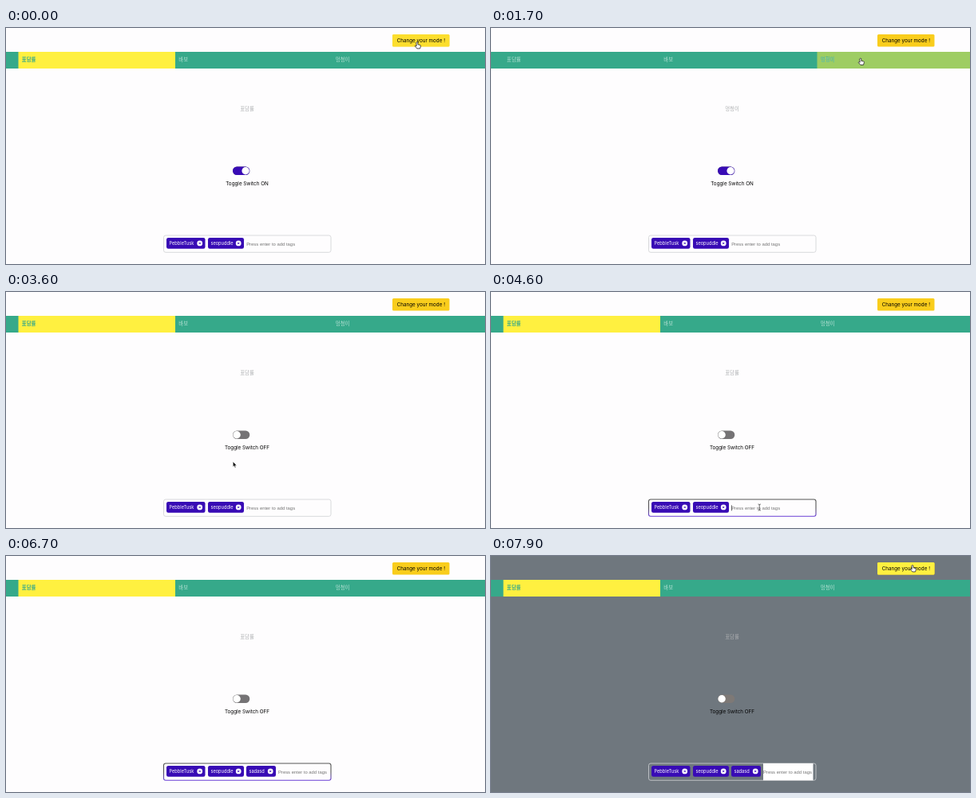
Write an HTML page that moves like this. It is 600 by 297 pixels and loops after 8 s.

```html
<!DOCTYPE html>
<html lang="ko">
<head>
<meta charset="utf-8">
<title>Components</title>
<style>
  html, body { margin: 0; height: 100%; overflow: hidden; background: #fefdfe; }
  svg { display: block; width: 100vw; height: 100vh; }
  text { font: 6.3px Inter, sans-serif; }
  .ko { font: 500 6.4px "Noto Sans CJK KR", "Noto Sans CJK", sans-serif; }
  .tag text { font-size: 5.7px; fill: #fff; }
  .field { font: 5.9px "Liberation Sans", Arial, sans-serif; }
  .mid { text-anchor: middle; }
</style>
</head>
<body>
<svg viewBox="0 0 600 297">
  <defs>
    <linearGradient id="focusLine" x2="0" y2="1">
      <stop offset=".5" stop-color="#555"/>
      <stop offset="1" stop-color="#6a3fd6"/>
    </linearGradient>
  </defs>
  <rect id="page" width="600" height="297"/>

  <rect x="484" y="8" width="71.5" height="15.5" rx="1.5" fill="#f9cd1c"/>
  <rect id="hover" x="484" y="8" width="71.5" height="15.5" rx="1.5" fill="#fff040"/>
  <text class="mid" x="519.8" y="17.8">Change your mode !</text>

  <rect y="30" width="600" height="21" fill="#36a98a"/>
  <g id="tabs"></g>
  <text id="content" class="ko mid" x="302" y="104" style="font-weight:400" fill="#adafb1"></text>

  <rect id="trackOff" x="284" y="174.5" width="21.3" height="10.4" rx="5.2"/>
  <rect id="trackOn" x="284" y="174.5" width="21.3" height="10.4" rx="5.2" fill="#380bb5"/>
  <circle id="knob" cy="179.7" r="4.7" fill="#fff"/>
  <text id="status" class="mid" x="302" y="197.8"></text>

  <rect id="box" x="197.5" y="261" width="209.5" height="21.3" rx="2.5" fill="none"/>
  <rect id="inputBack" x="341" y="261" width="62.5" height="21.3" fill="#fff"/>
  <g id="tags"></g>
  <text id="hint" class="field" y="274" fill="#757575">Press enter to add tags</text>
  <text id="typed" class="field" x="301.2" y="274"></text>
  <rect id="caret" y="268.3" width=".6" height="7" fill="#111"/>

  <g id="cursor" stroke-linejoin="round" stroke-linecap="round">
    <path id="hand" fill="#fff" stroke="#222" stroke-width=".8"
      d="M-1 .5Q0-.6 .9.5V3.3L3.8 3.9Q4.7 4.3 4.4 5.6L3.6 8.4H-.1L-2.7 5.3Q-2.8 4-1 4.9Z"/>
    <path id="arrow" fill="#111" stroke="#fff" stroke-width=".5"
      d="M0 0V6.6L1.5 5.3L2.5 7.7L3.6 7.2L2.6 4.9H4.6Z"/>
    <path id="beam" fill="none" stroke="#333" stroke-width=".7"
      d="M-1.3-4Q0-4 0-3.2V3.2Q0 4-1.3 4M1.3-4Q0-4 0-3.2M0 3.2Q0 4 1.3 4"/>
  </g>
</svg>

<script>
const LOOP = 8000;
const $ = id => document.getElementById(id);
const set = (id, attrs) => {
  for (const name in attrs) $(id).setAttribute(name, attrs[name]);
};
const show = (id, visible) => set(id, { opacity: visible ? 1 : 0 });

const tabs = [
  { name: '표담률', x: 15.5, w: 196.5 },
  { name: '바보', x: 212, w: 196.5 },
  { name: '멍청이', x: 408.5, w: 191.5 }
];
const tags = [
  { name: 'PebbleTusk', x: 201, w: 48.5 },
  { name: 'seopuddle', x: 253, w: 45 },
  { name: 'sadasd', x: 301, w: 37 }
];

$('tabs').innerHTML = tabs.map(({ name, x, w }, i) => {
  const label = style => `<text class="ko" x="${x + 4.3}" y="42.4" ${style}>${name}</text>`;
  return label('fill="#b9e2d6"') + `<g id="tab${i}">
    <rect x="${x}" y="30" width="${w}" height="21" fill="#fff040"/>
    ${label('fill="#36a98a" style="font-weight:700"')}</g>`;
}).join('');

$('tags').innerHTML = tags.map(({ name, x, w }, i) => {
  const cx = x + w - 6.8;
  return `<g class="tag" id="tag${i}">
    <rect x="${x}" y="264" width="${w}" height="13.7" rx="2.3" fill="#380bb5"/>
    <text x="${x + 3.4}" y="273.2">${name}</text>
    <circle cx="${cx}" cy="270.9" r="3.4" fill="#fff"/>
    <path d="M${cx - 1.2} 269.7l2.4 2.4m0-2.4l-2.4 2.4" stroke="#380bb5" stroke-width=".8"/></g>`;
}).join('');

// Times in ms
const TOGGLE = 3000, FOCUS = 4550, TYPE = 5000, KEY_GAP = 110;
const ENTER = 5995, BLUR = 7500, DARK = 7700, BLINK = 560, FADE = 500;
const WORD = tags[2].name;
const selections = [[-FADE, 0], [930, 1], [1550, 2], [2270, 0]];

const pointer = [
  [0, 515, 17.5], [100, 515, 17.5], [800, 310, 38], [1100, 309.8, 37.5],
  [1480, 470, 38], [1650, 470, 38], [2230, 146, 41], [2400, 139.5, 50.5],
  [2900, 294, 178], [3200, 294, 179], [3600, 284.3, 213.5],
  [4450, 335, 271], [4800, 338, 271], [7000, 338, 271],
  [7450, 527, 13], [7600, 528, 11.5], [LOOP, 528, 11.5]
];
const hover = [[0, .5], [200, .75], [700, 0], [7300, 0], [7600, .8], [7750, 1], [LOOP, 1]];

const clamp = v => Math.min(1, Math.max(0, v));
const smooth = p => p * p * (3 - 2 * p);

// CSS "ease": cubic-bezier(.25, .1, .25, 1)
function ease(p) {
  p = clamp(p);
  const curve = (a, b, s) => 3 * a * s * (1 - s) ** 2 + 3 * b * s * s * (1 - s) + s ** 3;
  let lo = 0, hi = 1;
  for (let i = 0; i < 20; i++) {
    const s = (lo + hi) / 2;
    if (curve(.25, .25, s) < p) lo = s; else hi = s;
  }
  return curve(.1, 1, lo);
}

function sample(steps, t, timing = p => p) {
  const i = Math.max(1, steps.findIndex(step => step[0] > t));
  const [a, b] = [steps[i - 1], steps[i]];
  const p = timing(clamp((t - a[0]) / (b[0] - a[0])));
  return a.slice(1).map((v, k) => v + (b[k + 1] - v) * p);
}

function drawTabs(t) {
  const [since, active] = selections.filter(s => s[0] <= t).pop();
  tabs.forEach((_, i) => set('tab' + i, { opacity: i === active ? ease((t - since) / FADE) : 0 }));
  $('content').textContent = tabs[active].name;
}

function drawToggle(t, dark) {
  const off = ease((t - TOGGLE) / FADE);
  set('trackOff', { fill: dark ? '#7e7976' : '#757375' });
  set('trackOn', { opacity: 1 - off });
  set('knob', { cx: 300.1 - 11 * off });
  $('status').textContent = 'Toggle Switch ' + (t < TOGGLE ? 'ON' : 'OFF');
}

function drawInput(t, dark) {
  const focused = t >= FOCUS && t < BLUR;
  const added = t >= ENTER;
  const count = added ? 0 : Math.min(WORD.length, Math.max(0, Math.floor((t - TYPE) / KEY_GAP) + 1));
  const start = added ? 341 : 301.2;
  const lastAction = added ? ENTER : count ? TYPE + (count - 1) * KEY_GAP : FOCUS;

  set('box', {
    stroke: focused ? 'url(#focusLine)' : dark ? '#c3c7ca' : '#d5d6d8',
    'stroke-width': focused ? 1.1 : .9
  });
  show('inputBack', dark);
  show('tag2', added);
  set('hint', { x: start });
  show('hint', count === 0);
  $('typed').textContent = WORD.slice(0, count);
  set('caret', { x: start + (count ? $('typed').getComputedTextLength() : 0) });
  show('caret', focused && (t - lastAction) % (2 * BLINK) < BLINK);
}

function drawPointer(t) {
  const [x, y] = sample(pointer, t, smooth);
  const inside = (l, top, r, b) => x >= l && x <= r && y >= top && y <= b;
  const onInput = inside(301, 261, 404, 282);
  const onHand = inside(484, 8, 556, 23.5) || inside(15, 30, 600, 51) || inside(284, 174, 306, 185);
  set('cursor', { transform: `translate(${x} ${y})` });
  show('cursor', t < TYPE || t >= 7000);
  show('beam', onInput);
  show('hand', onHand);
  show('arrow', !onInput && !onHand);
}

function draw(t) {
  const dark = t >= DARK;
  set('page', { fill: dark ? '#6f777e' : '#fefdfe' });
  set('hover', { opacity: sample(hover, t)[0] });
  drawTabs(t);
  drawToggle(t, dark);
  drawInput(t, dark);
  drawPointer(t);
}

const begin = performance.now();
function tick() {
  draw((performance.now() - begin) % LOOP);
  requestAnimationFrame(tick);
}
tick();
</script>
</body>
</html>
```
